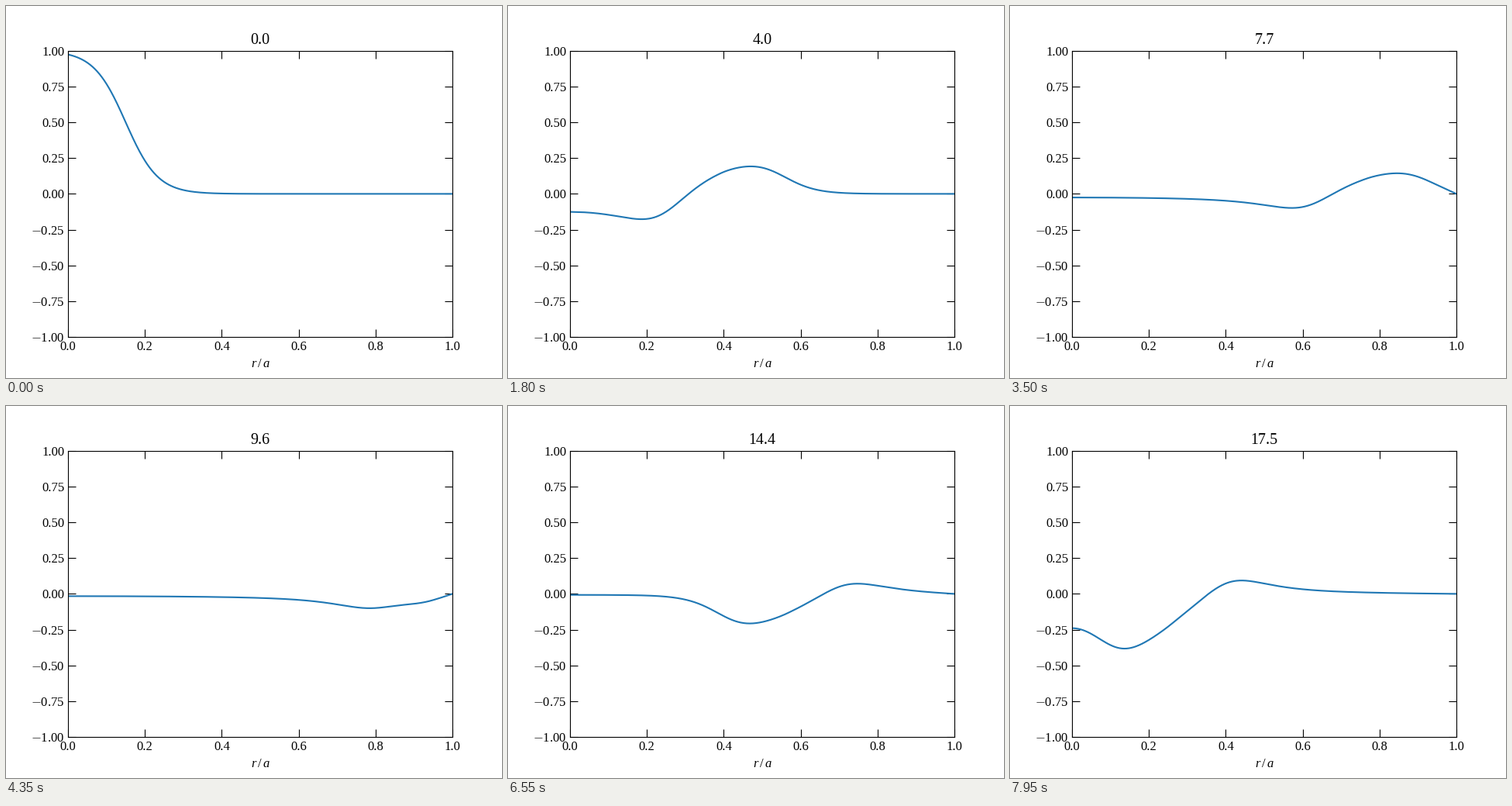
A matplotlib script for the animation above (8000 ms loop, 640 px wide and 480 px high).

```python
import numpy as np
import matplotlib.pyplot as plt
from matplotlib.animation import FuncAnimation
from matplotlib.ticker import FuncFormatter

plt.rcParams.update({
    "font.family": "Liberation Serif",
    "font.size": 12,
    "mathtext.fontset": "cm",
    "mathtext.it": "Liberation Serif:italic",
    "mathtext.rm": "Liberation Serif",
})

FRAMES, INTERVAL = 160, 50
DT = 0.11           # time between frames
SPEED = 0.1         # wave speed, radii per unit of time
CELLS, SUBSTEPS = 500, 11

r = np.linspace(0, 1, CELLS + 1)
dr = r[1]


def laplacian(u):
    """Radial Laplacian of an axisymmetric membrane, fixed at r = 1."""
    out = np.zeros_like(u)
    out[0] = 4 * (u[1] - u[0]) / dr**2
    out[1:-1] = ((u[2:] - 2 * u[1:-1] + u[:-2]) / dr**2
                 + (u[2:] - u[:-2]) / (2 * dr * r[1:-1]))
    return out


def solve():
    """Leapfrog solution of the wave equation, one row per frame."""
    k = (SPEED * DT / SUBSTEPS) ** 2
    u = 0.5 * (1 - np.tanh((r - 0.15) / 0.0835))
    u[-1] = 0
    prev = u + 0.5 * k * laplacian(u)
    rows = [u]
    for _ in range(FRAMES - 1):
        for _ in range(SUBSTEPS):
            prev, u = u, 2 * u - prev + k * laplacian(u)
        rows.append(u)
    return rows


def signed(value, _):
    return ("$-$" if value < 0 else "") + f"{abs(value):.2f}"


waves = solve()

fig, ax = plt.subplots(figsize=(6.4, 4.8), dpi=100)
line, = ax.plot(r, waves[0], color="tab:blue", lw=1.5)
ax.set(xlim=(0, 1), ylim=(-1, 1),
       xticks=np.linspace(0, 1, 6), yticks=np.linspace(-1, 1, 9))
ax.xaxis.set_major_formatter(FuncFormatter(lambda v, _: f"{v:.1f}"))
ax.yaxis.set_major_formatter(FuncFormatter(signed))
ax.tick_params(direction="in", length=7, top=True, right=True)
title = ax.set_title("0.0")
fig.text(0.5125, 1 - 466 / 480, r"$r\,/\,a$", ha="center", va="baseline",
         math_fontfamily="custom")


def draw(i):
    line.set_ydata(waves[i])
    title.set_text(f"{i * DT:.1f}")
    return line, title


anim = FuncAnimation(fig, draw, frames=FRAMES, interval=INTERVAL,
                     repeat=True, repeat_delay=0)
plt.show()
```
